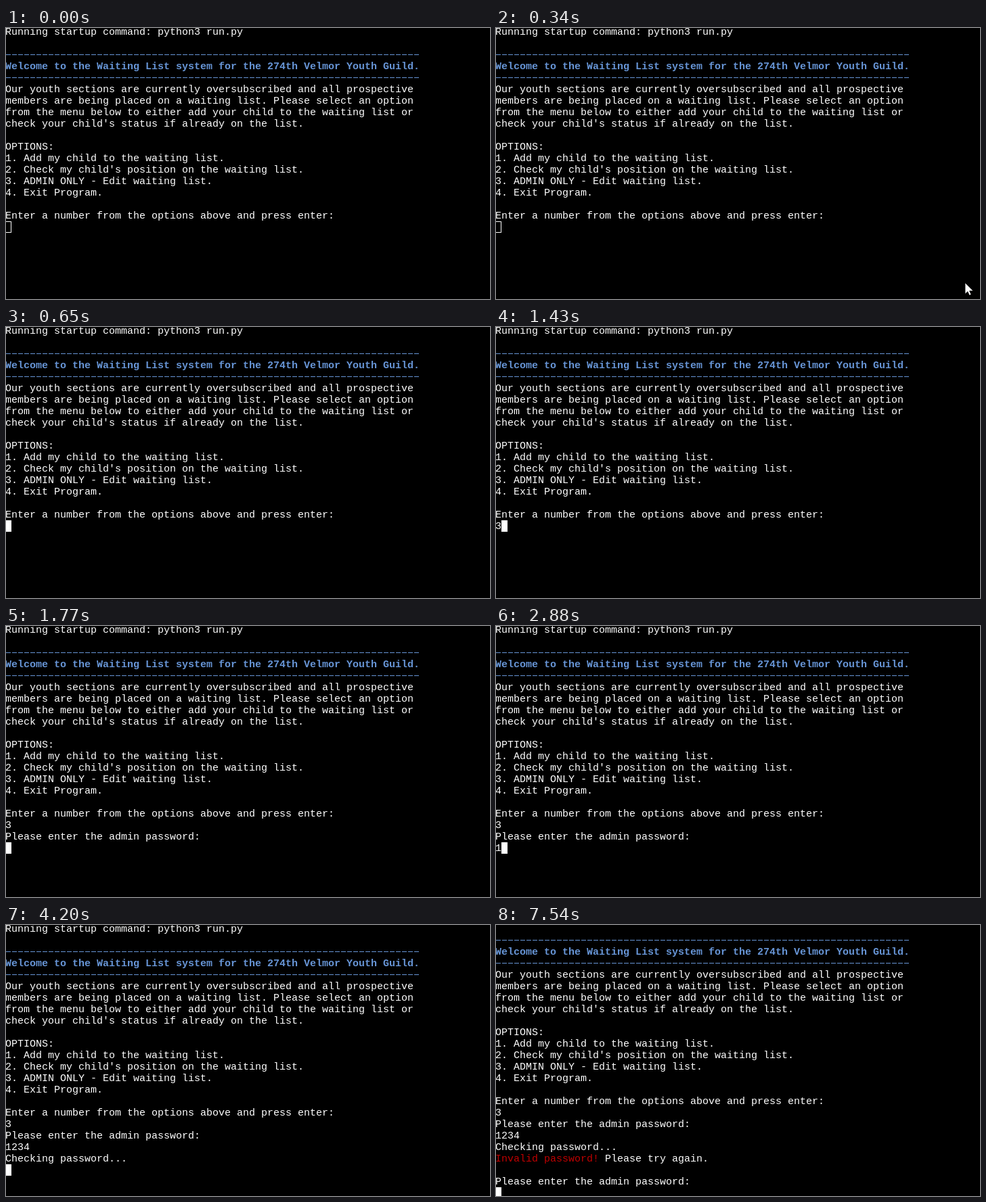
These frames come from a looping animation (715x401 px, 8000 ms). An HTML page:

```html
<!DOCTYPE html>
<html lang="en">
<head>
<meta charset="utf-8">
<style>
  html, body { margin: 0; width: 100%; height: 100%; overflow: hidden; background: #000; }
  #stage { position: relative; width: 715px; height: 401px; overflow: hidden; }
  pre {
    position: absolute; left: -1px; top: -2px; margin: 0; color: #fff;
    font: 15px/17px "Liberation Mono", "Courier New", monospace;
    font-variant-ligatures: none;
  }
  /* wide, one pixel high dashes, one per character cell */
  .rule {
    display: inline-block; height: 17px; vertical-align: top; color: transparent;
    background: repeating-linear-gradient(90deg, #0000 0 1px, #6795d6 1px 8px, #0000 8px 9px) 0 7px / 100% 1px no-repeat;
  }
  b { color: #6795d6; }
  i { color: #c00000; font-style: normal; }
  #caret { position: absolute; box-sizing: border-box; width: 9px; height: 17px; border: 1px solid #fff; }
  #mouse { position: absolute; left: 0; top: 0; overflow: visible; }
</style>
</head>
<body>
<div id="stage">
  <pre id="screen"></pre>
  <div id="caret"></div>
  <svg id="mouse" width="13" height="20">
    <path d="M0 0V16.5L3.8 13L6.3 18.6L9 17.4L6.5 12H12Z" fill="#fff" stroke="#000" stroke-width=".7"/>
  </svg>
</div>
<script>
const LOOP = 8000, CELL = 9, ROW = 17, ROWS = 24;
const SUBMIT = 1770, CHECK = 4200, REJECT = 7540;
const FOCUS = 530, LEAVE = 650;
const keys = [[1430, "3"], [2880, "1"], [3070, "2"], [3280, "3"], [3510, "4"]];

const [screen, caret, mouse] = ["screen", "caret", "mouse"].map(id => document.getElementById(id));
const rule = `<span class="rule">${"-".repeat(68)}</span>`;
const menu = `Running startup command: python3 run.py

${rule}
<b>Welcome to the Waiting List system for the 274th Velmor Youth Guild.</b>
${rule}
Our youth sections are currently oversubscribed and all prospective
members are being placed on a waiting list. Please select an option
from the menu below to either add your child to the waiting list or
check your child's status if already on the list.

OPTIONS:
1. Add my child to the waiting list.
2. Check my child's position on the waiting list.
3. ADMIN ONLY - Edit waiting list.
4. Exit Program.

Enter a number from the options above and press enter:
`;
const askPassword = "Please enter the admin password:\n";

const typed = (t, from, to) =>
  keys.filter(([at]) => at >= from && at < to && at <= t).map(k => k[1]).join("");

function output(t) {
  let text = menu + typed(t, 0, SUBMIT);
  if (t >= SUBMIT) text += "\n" + askPassword + typed(t, SUBMIT, CHECK);
  if (t >= CHECK) text += "\nChecking password...\n";
  if (t >= REJECT) text += "<i>Invalid password!</i> Please try again.\n\n" + askPassword;
  return text;
}

function drawMouse(t) {
  const clamp = v => Math.min(1, Math.max(0, v));
  const enter = 1 - (1 - clamp((t - 100) / 350)) ** 2;
  const leave = clamp((t - FOCUS) / (LEAVE - FOCUS)) ** 2;
  const x = 660 + 37 * enter - 6 * leave;
  const y = 402 - 28 * enter + 28 * leave;
  mouse.style.display = t >= 100 && t < LEAVE ? "block" : "none";
  mouse.style.transform = `translate(${Math.round(x)}px, ${Math.round(y)}px)`;
}

let shown = "";
function draw(now) {
  const t = now % LOOP;
  const text = output(t);
  const lines = text.split("\n");
  const scroll = Math.max(0, lines.length - ROWS);
  if (text !== shown) {
    screen.innerHTML = shown = text;
    screen.style.top = -2 - scroll * ROW + "px";
  }
  caret.style.left = lines.at(-1).length * CELL - 1 + "px";
  caret.style.top = (lines.length - 1 - scroll) * ROW - 3 + "px";
  caret.style.background = t >= FOCUS ? "#fff" : "none";
  drawMouse(t);
  requestAnimationFrame(draw);
}
draw(performance.now());
</script>
</body>
</html>
```
